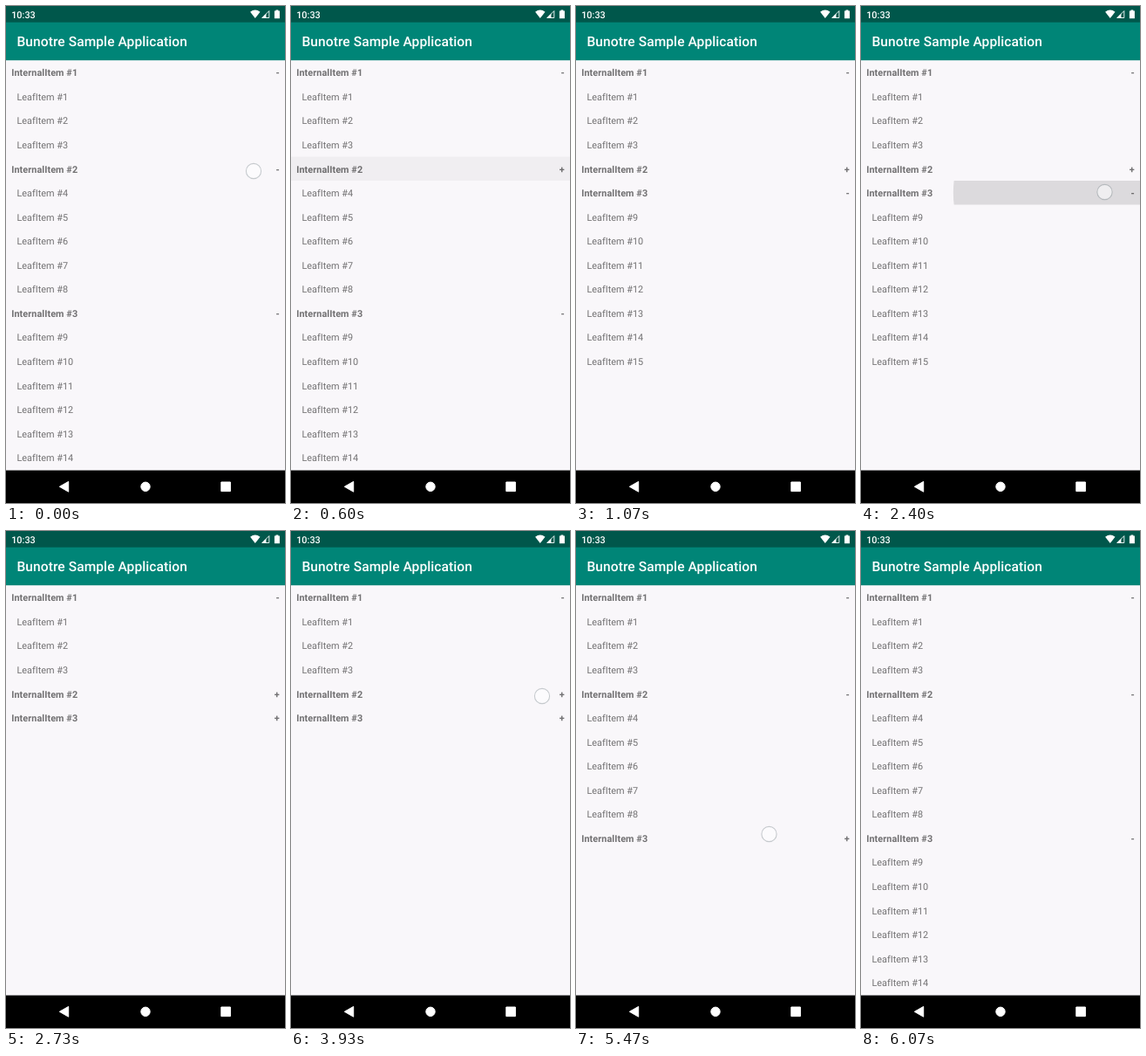
These frames come from a looping animation (320x569 px, 6140 ms). An HTML page:

```html
<!DOCTYPE html>
<html lang="en">
<head>
<meta charset="utf-8">
<title>Expandable list</title>
<style>
  html, body { margin: 0; width: 100%; height: 100%; overflow: hidden; background: #f9f7fa; }
  svg { display: block; }
  text { font: 10.89px Roboto, "Liberation Sans", sans-serif; text-rendering: geometricPrecision; white-space: pre; }
  #rows text { fill: #000; fill-opacity: .54; }
  #rows .head { font-weight: 700; letter-spacing: .005em; }
  .sign { text-anchor: end; }
  .clock { font-weight: 500; }
  .title { font-size: 15.56px; font-weight: 500; letter-spacing: .005em; }
</style>
</head>
<body>
<svg id="stage" width="320" height="569" viewBox="0 0 320 569">
  <defs>
    <clipPath id="listClip"><rect y="62.2" width="320" height="469.4"/></clipPath>
  </defs>
  <rect width="320" height="569" fill="#f9f7fa"/>

  <g clip-path="url(#listClip)">
    <svg id="band" width="320" height="27.56" overflow="hidden"><circle id="ripple" cy="13.78"/></svg>
    <g id="rows"></g>
  </g>

  <rect width="320" height="62.2" fill="#008577"/>
  <rect width="320" height="18.67" fill="#00574b"/>
  <g fill="#fff">
    <text class="clock" x="6.2" y="13.8">10:33</text>
    <text class="title" x="12.4" y="46.4">Bunotre Sample Application</text>
    <path d="M280.1 6.7Q285.8 2.5 291.5 6.7L285.8 13.9Z"/>
    <path d="M301.8 5.6V13.5H293.9Z" fill="none" stroke="#fff" stroke-width=".9"/>
    <path d="M293.2 13.9L298.4 8.7V13.9Z"/>
    <path d="M309.5 4.4h2.8v1h1.6v8.8h-6V5.4h1.6z"/>
  </g>

  <rect y="531.6" width="320" height="37.4" fill="#000"/>
  <g fill="#fff" stroke="#fff" stroke-linejoin="round">
    <path d="M61.3 550.3L71.7 544.4V556.2Z"/>
    <circle cx="160" cy="550.3" r="5.2"/>
    <path d="M246.8 545h10.6v10.6h-10.6z"/>
  </g>

  <circle id="touch" r="8.6" fill="#fff" fill-opacity=".55" stroke="#5a6a70" stroke-opacity=".32" stroke-width="1.1"/>
</svg>
<script>
const LOOP = 6140, STEP = 200 / 3;
const TOP = 62.2, ROW = 27.56, WIDTH = 320;
const $ = id => document.getElementById(id);
const clamp = v => Math.min(1, Math.max(0, v));
const ease = p => (1 - Math.cos(Math.PI * clamp(p))) / 2;

// show/hide: pointer; start/fade: ripple; from: first moment the ripple is drawn
const taps = [
  { x: 284,   y: 189, row: 4,  show: 0,    hide: 480,  start: 62,   fade: 495,  from: 62 },
  { x: 279.5, y: 213, row: 5,  show: 2060, hide: 2430, start: 2328, fade: 2553, from: 2328 },
  { x: 288,   y: 189, row: 4,  show: 3930, hide: 4300, start: 4195, fade: 4450, from: 4195 },
  { x: 221.5, y: 347, row: 10, show: 5460, hide: 5790, start: 5690, fade: 5915, from: 5790 }
];

// Each change is [time, duration, value]
const tracks = {
  shift: [[0, 0, 0], [760, 250, 1], [4333, 250, 0]],
  leaves2: [[0, 0, 1], [640, 120, 0], [4583, 120, 1]],
  leaves3: [[0, 0, 1], [2460, 120, 0], [5807, 120, 1]]
};
function track(list, t) {
  return list.reduce((v, [at, span, to]) =>
    t < at ? v : v + (to - v) * (span ? ease((t - at) / span) : 1), 0);
}

// cubic-bezier(.4, 0, .2, 1)
function fastOut(x) {
  let lo = 0, hi = 1, s = 0.5;
  for (let i = 0; i < 20; i++) {
    s = (lo + hi) / 2;
    const bx = 1.2 * (1 - s) ** 2 * s + 0.6 * (1 - s) * s * s + s ** 3;
    if (bx < x) lo = s; else hi = s;
  }
  return s * s * (3 - 2 * s);
}

function set(el, attrs) {
  for (const key in attrs) el.setAttribute(key, attrs[key]);
}
function make(tag, parent, attrs, label = "") {
  const el = document.createElementNS("http://www.w3.org/2000/svg", tag);
  set(el, attrs);
  el.textContent = label;
  return parent.appendChild(el);
}

const signs = [], leaves = [];
const section3 = make("g", $("rows"), {});
let row = 0, leaf = 0;
[3, 5, 7].forEach((count, i) => {
  const parent = i === 2 ? section3 : $("rows");
  const baseline = () => TOP + ROW * row++ + 18.1;
  const y = baseline();
  make("text", parent, { class: "head", x: 6.2, y }, "InternalItem #" + (i + 1));
  signs[i] = make("text", parent, { class: "head sign", x: 313.8, y }, "-");
  leaves[i] = make("g", parent, {});
  for (let k = 0; k < count; k++)
    make("text", leaves[i], { x: 12.4, y: baseline() }, "LeafItem #" + ++leaf);
});

function drawTap(t) {
  const tap = taps.filter(a => t >= a.show).pop();
  const age = t - tap.start;
  const p = fastOut(clamp(age / 225));
  const full = Math.hypot(WIDTH, ROW) / 2, first = WIDTH * 0.3;
  const alpha = t < tap.from ? 0 : clamp(age / 75) * (1 - clamp((t - tap.fade) / 150));
  set($("band"), { y: TOP + ROW * tap.row });
  set($("ripple"), {
    cx: tap.x + p * (WIDTH / 2 - tap.x),
    r: first + p * (full - first),
    "fill-opacity": 0.122 * alpha
  });
  set($("touch"), { cx: tap.x, cy: tap.y, opacity: t < tap.hide ? 1 : 0 });
}

function draw(t) {
  drawTap(t);
  set(section3, { transform: `translate(0 ${-5 * ROW * track(tracks.shift, t)})` });
  set(leaves[1], { opacity: track(tracks.leaves2, t) });
  set(leaves[2], { opacity: track(tracks.leaves3, t) });
  signs[1].textContent = t >= 520 && t < 4300 ? "+" : "-";
  signs[2].textContent = t >= 2430 && t < 5800 ? "+" : "-";
}

const begin = performance.now();
function tick() {
  const t = (performance.now() - begin) % LOOP;
  draw(Math.min(91, Math.floor((t + 5) / STEP)) * STEP);
  requestAnimationFrame(tick);
}
tick();
</script>
</body>
</html>
```
